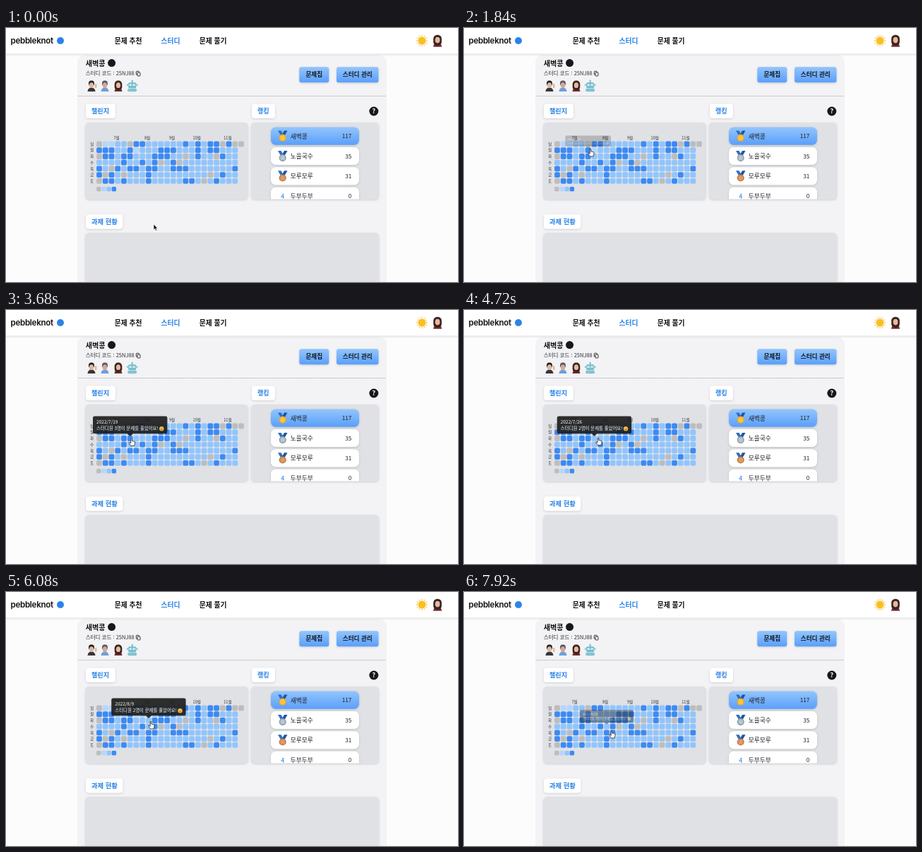
These frames come from a looping animation (640x360 px, 8 s). An HTML page:

```html
<!DOCTYPE html>
<html lang="ko">
<head>
<meta charset="utf-8">
<title>Study board</title>
<style>
html, body { margin: 0; width: 100%; height: 100%; overflow: hidden; background: #fcfcfd; }
svg { display: block; width: 100%; height: 100%; font-family: "Noto Sans CJK KR", "Noto Sans CJK JP", "Noto Sans CJK", sans-serif; }
.b { font-weight: 700; }
.m { font-weight: 500; }
.brand { font-family: Inter, "Liberation Sans", sans-serif; font-weight: 600; }
.soft { filter: drop-shadow(0 1px 1.5px rgba(0, 0, 0, .15)); }
</style>
</head>
<body>
<svg id="stage" viewBox="0 0 640 360">
  <defs>
    <linearGradient id="blue" x2="0" y2="1">
      <stop stop-color="#93c5fd"/><stop offset="1" stop-color="#5a9ffa"/>
    </linearGradient>
    <clipPath id="rankClip"><rect x="347" y="134" width="181" height="108.5" rx="5"/></clipPath>
  </defs>
  <g id="page"></g>
  <g id="tips"></g>
  <g id="cursor" stroke-linejoin="round">
    <path id="arrow" d="M0 0V8.2L1.9 6.5L3.2 9.3L4.7 8.6L3.4 5.9H5.8Z" fill="#111" stroke="#fff" stroke-width=".7"/>
    <path id="hand" d="M-.8 .8Q0-.5.8.8V4L2.2 4.2L3.7 4.6L5 5.2V8L4 11H-.7L-3.3 7.2Q-3.4 6-2.3 6.2L-.8 7.4Z" fill="#fff" stroke="#222" stroke-width=".8"/>
  </g>
</svg>
<script>
const $ = id => document.getElementById(id);
const page = $("page");

function add(parent, tag, attrs, text) {
  const node = document.createElementNS("http://www.w3.org/2000/svg", tag);
  for (const key in attrs) node.setAttribute(key, attrs[key]);
  if (text !== undefined) node.textContent = text;
  parent.appendChild(node);
  return node;
}
const box = (parent, x, y, width, height, rx, fill, more) =>
  add(parent, "rect", { x, y, width, height, rx, fill, ...more });
const dot = (parent, cx, cy, r, fill) => add(parent, "circle", { cx, cy, r, fill });
const path = (parent, d, fill, more) => add(parent, "path", { d, fill, ...more });
const text = (parent, x, y, size, str, fill = "#1c1f24", more) =>
  add(parent, "text", { x, y, "font-size": size, fill, ...more }, str);

const bold = { class: "b" }, medium = { class: "m" }, soft = { class: "soft" };
const LINK = "#2680e8";

// Heatmap geometry
const X0 = 128.1, Y0 = 160.6, PITCH = 8.74, CELL = 7.8;
const SHADES = ["#bdbdbd", "#b5d6fe", "#91c5fd", "#3b8af4"];
const ROWS = [
  "011220332222223232330300",
  "33322312223332223233222",
  "03323322233322023220322",
  "22223223230230222222222",
  "32032332332233322222223",
  "30320222322222222202322",
  "03323222322222332023222"
];

function drawHeader() {
  box(page, -5, -10, 650, 46.5, 0, "#fff", soft);
  text(page, 6.5, 22.4, 11.6, "pebbleknot", "#111", { class: "brand", "letter-spacing": "-.3" });
  dot(page, 77, 18, 5, "#2b83ea");
  text(page, 153.7, 22, 9.8, "문제 추천", "#111", bold);
  text(page, 219.5, 22, 9.8, "스터디", LINK, bold);
  text(page, 273.7, 22, 9.8, "문제 풀기", "#111", bold);
  for (let i = 0; i < 12; i++)
    path(page, "M-1.2-6.2L0-9L1.2-6.2Z", "#f7cf74", { transform: `translate(589 18) rotate(${i * 30})` });
  dot(page, 589, 18, 5.5, "#fac021");
  drawPerson(611, 18, "#3a2420", "#e8b89c", "#7b2f35", 1.1);
}

function drawPerson(x, y, hair, skin, shirt, scale = 1) {
  const g = add(page, "g", { transform: `translate(${x} ${y}) scale(${scale})` });
  path(g, "M-5.5 8Q-5 2.5 0 2.5T5.5 8Z", shirt);
  if (shirt === "#7b2f35") box(g, -5.3, -7.5, 10.6, 14, 5, hair);
  else box(g, -4, -7.5, 8, 8, 3.8, hair);
  add(g, "ellipse", { cy: -.8, rx: 3.1, ry: 3.9, fill: skin });
}

function drawRobot(x, y) {
  const g = add(page, "g", { transform: `translate(${x} ${y})` });
  box(g, -5.5, -4.5, 11, 8, 1.5, "#78bccb");
  box(g, -7.8, -2.5, 15.6, 3, 1, "#92ccd7");
  box(g, -1, -8, 2, 4, .5, "#78bccb");
  box(g, -6.5, 4, 13, 4.5, 2, "#82c4d0");
  dot(g, -2.5, -1, 1.3, "#e8f5f7");
  dot(g, 2.5, -1, 1.3, "#e8f5f7");
}

function label(x, y, w, str, size = 9.1) {
  box(page, x, y, w, 20.5, 4, "#fff", soft);
  text(page, x + 8, y + 13.6, size, str, LINK, bold);
}

function button(x, w, str) {
  box(page, x, 55.2, w, 22, 3, "url(#blue)", soft);
  text(page, x + w / 2, 69.4, 8.6, str, "#14181f", { class: "b", "text-anchor": "middle" });
}

function drawStudy() {
  box(page, 101, 38, 438, 340, 11, "#f3f3f5");
  path(page, "M102 96.5H538", "none", { stroke: "#aaa", "stroke-width": .8, "stroke-dasharray": "1.5 .7" });
  text(page, 112.8, 53.5, 10.1, "새벽콩", "#111", bold);
  dot(page, 149.6, 49.6, 5.5, "#15181c");
  text(page, 112.8, 67.3, 7.5, "스터디 코드 : 25NJ88", "#2c2f34");
  const line = { stroke: "#222", "stroke-width": .9 };
  box(page, 184.3, 61.3, 4, 5, .8, "none", line);
  box(page, 186, 63, 4, 5, .8, "#f3f3f5", line);
  drawPerson(121, 82, "#222", "#dfb79d", "#36383d");
  box(page, 126, 79, 2.4, 6, 1, "#d9b59e");
  drawPerson(140, 82, "#5a5663", "#d3a995", "#6f9fdb");
  drawPerson(159, 82, "#3a2420", "#e8b89c", "#7b2f35");
  drawRobot(178.7, 81.8);
  button(415.3, 42, "문제집");
  button(468, 59.5, "스터디 관리");
  label(113, 107.6, 42, "챌린지");
  label(348, 107.6, 33, "랭킹");
  label(113, 264.2, 52.5, "과제 현황", 9.3);
  dot(page, 520.8, 118, 6.5, "#15171b");
  text(page, 520.8, 121.4, 9.5, "?", "#fff", { class: "b", "text-anchor": "middle" });
  box(page, 112.5, 134, 230, 109, 5, "#dfe1e5", soft);
  box(page, 347.3, 134, 180.5, 109, 5, "#dfe1e5", soft);
  box(page, 112.5, 290.5, 415.5, 90, 5, "#dfe1e5", soft);
}

function drawHeatmap() {
  [[7, 152.4], [8, 196], [9, 231], [10, 264.6], [11, 308.2]].forEach(([m, x]) =>
    text(page, x, 158, 5.6, m + "월", "#333", medium));
  ROWS.forEach((row, r) => {
    text(page, 121.6, Y0 + r * PITCH + 6, 5.3, "일월화수목금토"[r], "#333", { class: "m", "text-anchor": "middle" });
    [...row].forEach((v, c) =>
      box(page, X0 + c * PITCH, Y0 + r * PITCH, CELL, CELL, 2, SHADES[v]));
  });
  SHADES.forEach((shade, i) => box(page, 128.1 + i * 7.2, 225, 6.4, 6.6, 1.6, shade));
}

function medal(parent, y, rim, face) {
  path(parent, `M385 ${y - 8}h4.5l4 7h-4.5Z`, "#2c6fc4");
  path(parent, `M398.5 ${y - 8}h-4.5l-4 7h4.5Z`, "#1d559f");
  dot(parent, 391.7, y + 2.2, 5.1, rim);
  dot(parent, 391.7, y + 2.2, 3.5, face);
}

function drawRanking() {
  const list = add(page, "g", { "clip-path": "url(#rankClip)" });
  const medals = [["#f0a928", "#fcc63d"], ["#8e9fac", "#b7c5cf"], ["#c27a48", "#e09a63"]];
  [["새벽콩", 117], ["노을국수", 35], ["모루모루", 31], ["두부두부", 0]].forEach(([name, score], i) => {
    const y = 140.5 + i * 28.4;
    box(list, 375, y, 125, 25.2, 7, i ? "#fff" : "url(#blue)", soft);
    if (medals[i]) medal(list, y + 13, ...medals[i]);
    else text(list, 391.7, y + 16, 9, i + 1, LINK, { "text-anchor": "middle" });
    text(list, 402.8, y + 16, 8.7, name);
    text(list, 489.3, y + 15.7, 8.2, score, "#1c1f24", { "text-anchor": "end" });
  });
}

// [show, hide, column, row, solvers]
const FADE = 200;
const TIPS = [
  [1796, 3140, 5, 1, 3], [3200, 4160, 5, 2, 3], [4280, 4800, 6, 2, 2],
  [5084, 6480, 8, 2, 2], [6580, 7808, 8, 3, 2]
].map(([show, hide, col, row, solvers]) => {
  const node = add($("tips"), "g", {});
  const day = new Date(Date.UTC(2022, 5, 12 + col * 7 + row));
  box(node, -52.7, -28, 105.4, 24.8, 2.5, "#1e1e1e");
  path(node, "M-4-3.4H4L0 .6Z", "#1e1e1e");
  text(node, -47.6, -17.6, 6.5, `2022/${day.getUTCMonth() + 1}/${day.getUTCDate()}`, "#fff");
  text(node, -47.6, -8.2, 6.4, `스터디원 ${solvers}명이 문제를 풀었어요!`, "#fff");
  dot(node, 44.6, -10.2, 3.2, "#f6b93b");
  path(node, "M42.9-9.8Q44.6-7.4 46.3-9.8", "none", { stroke: "#70430f", "stroke-width": .7 });
  return { node, show, hide, x: X0 + col * PITCH + CELL / 2, y: Y0 + row * PITCH + .4 };
});

// Pointer tip: [time, x, y]
const MOVES = [
  [0, 209, 278], [520, 209, 278], [1800, 179, 171], [2520, 179, 171],
  [3120, 178, 177.7], [3680, 177.5, 181.5], [3960, 177.5, 181.5],
  [4400, 186, 181], [4520, 186, 181], [5200, 205, 179], [5720, 205, 179],
  [6080, 205, 183], [7040, 205, 190], [7320, 205, 190], [7920, 209, 196], [8000, 209, 196]
];
const clamp = v => Math.min(1, Math.max(0, v));

function pointerAt(t) {
  const i = MOVES.findIndex(m => m[0] > t);
  const [t0, x0, y0] = MOVES[i - 1], [t1, x1, y1] = MOVES[i];
  const p = (t - t0) / (t1 - t0), e = p * p * (3 - 2 * p);
  return [x0 + (x1 - x0) * e, y0 + (y1 - y0) * e];
}

function overCell(x, y) {
  const dx = x - X0, dy = y - Y0;
  return dx > 0 && dy > 0 && dx < 23 * PITCH && dy < 7 * PITCH && dx % PITCH < CELL && dy % PITCH < CELL;
}

function render(t) {
  for (const tip of TIPS) {
    const k = clamp((t - tip.show) / FADE) - clamp((t - tip.hide) / FADE);
    tip.node.setAttribute("opacity", k * .92);
    tip.node.setAttribute("transform", `translate(${tip.x} ${tip.y}) scale(${.5 + .5 * k})`);
  }
  const [x, y] = pointerAt(t), hover = overCell(x, y);
  $("cursor").setAttribute("transform", `translate(${x} ${y})`);
  $("hand").setAttribute("visibility", hover ? "visible" : "hidden");
  $("arrow").setAttribute("visibility", hover ? "hidden" : "visible");
}

drawStudy();
drawHeader();
drawHeatmap();
drawRanking();

const start = performance.now();
function tick() {
  render((performance.now() - start) % 8000);
  requestAnimationFrame(tick);
}
tick();
</script>
</body>
</html>
```
